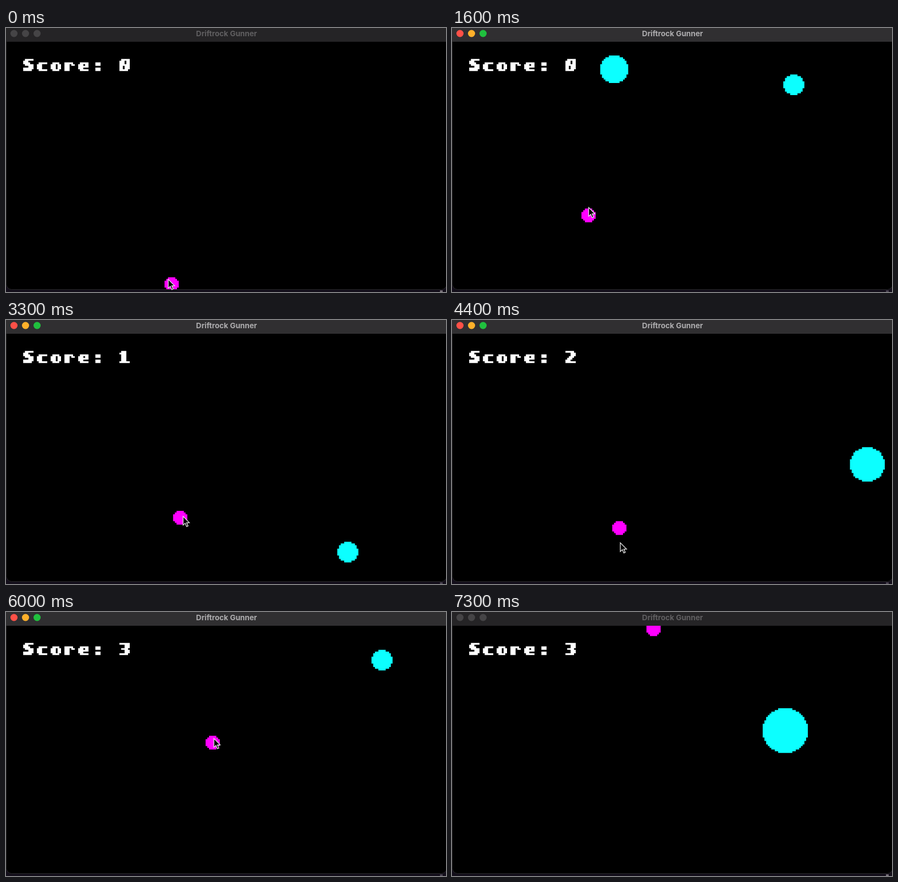
An HTML page with a canvas for the animation above (7.4 s loop, 800 by 480 pixels).

```html
<!DOCTYPE html>
<html lang="en">
<head>
<meta charset="utf-8">
<title>Driftrock Gunner</title>
<style>
  html, body { margin: 0; width: 100%; height: 100%; overflow: hidden; background: #000; }
  canvas { display: block; width: 800px; height: 480px; }
</style>
</head>
<body>
<canvas id="stage" width="800" height="480" aria-label="Driftrock Gunner, score counter"></canvas>
<script>
const ctx = document.getElementById('stage').getContext('2d');
const LOOP = 7400, STEP = 100, TOP = 25, BOTTOM = 475, CELL = 3.125;

// Seven-row pixel letters
const GLYPHS = {
  S: ['.#####', '###...', '####..', '.#####', '...###', '######', '#####.'],
  c: ['', '', '.#####', '###...', '###...', '###...', '.#####'],
  o: ['', '', '.####.', '###.##', '###.##', '###.##', '.####.'],
  r: ['', '', '#####', '###.##', '###...', '###...', '###...'],
  e: ['', '', '.#####', '###.##', '######', '###...', '.#####'],
  ':': ['', '', '..###', '..###', '', '..###', '..###'],
  0: ['.#####', '###.##', '###.##', '######', '##.###', '##.###', '#####.'],
  1: ['.###..', '####..', '.###..', '.###..', '.###..', '.###..', '######'],
  2: ['#####.', '...###', '...###', '..###.', '.###..', '###...', '######'],
  3: ['######', '...###', '...###', '.####.', '...###', '...###', '#####.']
};

// Each ball: centre x, radius, speed per tick, and a centre y known at time t
const BALLS = [
  { x: 105, r: 10, v: 4, t: 800, y: 148 },
  { x: 199, r: 6, v: 1, t: 2300, y: 67 },
  { x: 94, r: 8, v: 1, t: 2300, y: 58, hit: 2500 },
  { x: 242, r: 10, v: 2, t: 4400, y: 76 },
  { x: 219, r: 6, v: 2, t: 6000, y: 20 },
  { x: 194, r: 13, v: 1, t: 7300, y: 61 }
];
const POINTS = [2500, 3900, 5000];

// Tracks of [time, x, y]: player in game pixels, pointer in stage pixels
const PLAYER = [
  [0, 96, 141], [800, 94, 139], [1750, 78, 98], [2300, 95, 69], [2850, 99, 132],
  [3300, 101, 107], [4400, 97, 113], [6000, 120, 68], [7000, 117, 2]
];
const POINTER = [
  [0, 295, 457], [800, 297, 459], [1650, 248, 325], [2300, 297, 242], [2780, 308, 440],
  [3300, 322, 357], [4400, 306, 405], [6000, 378, 230], [6850, 367, -25]
];

function follow(track, t) {
  const i = track.findIndex(k => k[0] > t);
  if (i < 0) return track[track.length - 1].slice(1);
  const [t0, x0, y0] = track[i - 1], [t1, x1, y1] = track[i];
  const p = (t - t0) / (t1 - t0), e = p * p * (3 - 2 * p);
  return [x0 + (x1 - x0) * e, y0 + (y1 - y0) * e];
}

function disc(cx, cy, r, color) {
  const x = 2.6 + cx * 3.11;
  ctx.fillStyle = color;
  ctx.beginPath();
  for (let dy = 0.5 - r; dy < r; dy++) {
    const half = Math.floor(Math.sqrt(r * r - dy * dy) + 0.5) * CELL + 0.4;
    ctx.rect(x - half, TOP + (cy + dy - 0.5) * CELL, 2 * half, CELL);
  }
  ctx.fill();
}

function pixelText(str, gx, gy) {
  ctx.fillStyle = '#fff';
  ctx.beginPath();
  [...str].forEach((ch, n) => (GLYPHS[ch] || []).forEach((row, j) => {
    for (const run of row.matchAll(/#+/g)) {
      ctx.rect((gx + n * 8 + run.index) * CELL, TOP + (gy + j) * CELL, run[0].length * CELL, CELL);
    }
  }));
  ctx.fill();
}

function drawFrame(active) {
  ctx.fillStyle = '#130e1a';
  ctx.fillRect(0, 0, 800, 480);
  ctx.fillStyle = active ? '#4a4452' : '#777078';
  ctx.fillRect(789, 477, 5, 3);

  ctx.beginPath();
  ctx.roundRect(0.5, -20, 801, 495.5, 10);
  ctx.fillStyle = '#000';
  ctx.fill();
  ctx.strokeStyle = '#29282a';
  ctx.lineWidth = 1;
  ctx.stroke();

  ctx.fillStyle = active ? '#302f31' : '#252426';
  ctx.fillRect(0, 0, 800, 25);
  const lights = active ? ['#fe5047', '#feb02a', '#20c03e'] : Array(3).fill('#454446');
  lights.forEach((color, i) => {
    ctx.fillStyle = color;
    ctx.beginPath();
    ctx.arc(14.5 + i * 21, 10, 6.5, 0, Math.PI * 2);
    ctx.fill();
  });
  ctx.fillStyle = active ? '#aeadaf' : '#605f61';
  ctx.font = '700 13.6px Inter, Roboto, sans-serif';
  ctx.textAlign = 'center';
  ctx.fillText('Driftrock Gunner', 401, 14.5);
}

function drawPointer(x, y) {
  const shape = [[0, 0], [0, 16], [3.7, 12.6], [6.4, 18.6], [9, 17.4], [6.4, 11.6], [11.4, 11.6]];
  ctx.beginPath();
  shape.forEach(([dx, dy]) => ctx.lineTo(x + dx, y + dy));
  ctx.closePath();
  ctx.fillStyle = '#000';
  ctx.fill();
  ctx.strokeStyle = '#e8e8e8';
  ctx.lineWidth = 1.3;
  ctx.stroke();
}

function draw(time) {
  const t = Math.floor(time / STEP) * STEP;
  drawFrame(t >= 300 && t < 7100);

  ctx.save();
  ctx.beginPath();
  ctx.rect(1, TOP, 799, BOTTOM - TOP);
  ctx.clip();
  for (const b of BALLS) {
    const y = b.y + (t - b.t) * 0.06 * b.v;
    if (y >= 0 && !(t >= b.hit)) disc(b.x, Math.round(y), b.r, '#0cffff');
  }
  const [px, py] = follow(PLAYER, t);
  disc(Math.round(px), Math.round(py), 4, '#f0f');
  pixelText('Score: ' + POINTS.filter(p => t >= p).length, 10, 10);
  ctx.restore();

  drawPointer(...follow(POINTER, t));
}

const start = performance.now();
function tick() {
  draw((performance.now() - start) % LOOP);
  requestAnimationFrame(tick);
}
tick();
</script>
</body>
</html>
```
